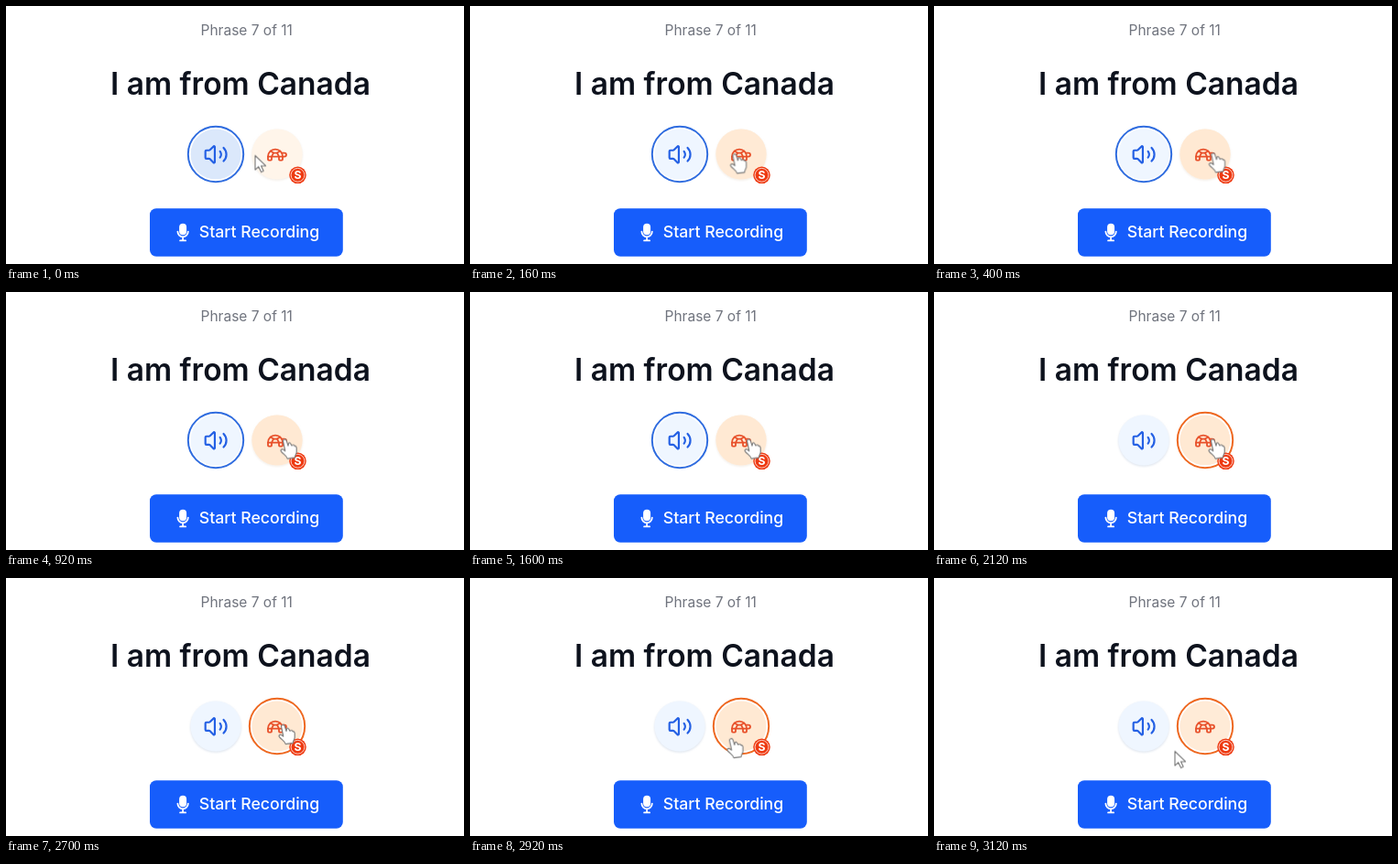
An HTML page for the animation above (3140 ms loop, 500 by 282 pixels).

```html
<!DOCTYPE html>
<html lang="en">
<head>
<meta charset="utf-8">
<title>Phrase practice</title>
<style>
  html, body { margin: 0; width: 100%; height: 100%; overflow: hidden; background: #fff; }
  svg { display: block; width: 100vw; height: 100vh; filter: blur(.35px); }
  text { font-family: Inter, sans-serif; font-optical-sizing: none; text-anchor: middle; }
  .line { fill: none; stroke-linecap: round; stroke-linejoin: round; }
  .cursor path { fill: #fff; stroke: #777; stroke-width: 1.1; stroke-linejoin: round; }
</style>
</head>
<body>
<svg viewBox="0 0 500 282">
  <defs>
    <filter id="soft" x="-20%" y="-20%" width="140%" height="140%">
      <feGaussianBlur stdDeviation="1.3"/>
    </filter>
  </defs>

  <text x="262.7" y="31.9" font-size="15.5" fill="#70747e">Phrase 7 of 11</text>
  <text x="256" y="96.7" font-size="33.5" font-weight="600" fill="#0d121d">I am from Canada</text>

  <!-- Normal speed -->
  <circle cx="229" cy="163" r="27.8" fill="#e0e6ef" filter="url(#soft)"/>
  <circle cx="229" cy="162" r="27.6" fill="#eff6ff"/>
  <circle id="speakerHover" cx="229" cy="162" r="27.6" fill="#dbe8fb"/>
  <g id="speakerRing" class="line">
    <circle cx="229" cy="162" r="28.5" stroke="#fff" stroke-width="1.8"/>
    <circle cx="229" cy="162" r="30.2" stroke="#2f6cdf" stroke-width="2"/>
  </g>
  <g class="line" transform="translate(215.4 148.6) scale(1.14)" stroke="#2460e4" stroke-width="1.9">
    <path d="M11 4.7a.7.7 0 0 0-1.2-.5L6.4 7.6A1.4 1.4 0 0 1 5.4 8H3a1 1 0 0 0-1 1v6a1 1 0 0 0 1 1h2.4a1.4 1.4 0 0 1 1 .4l3.4 3.4a.7.7 0 0 0 1.2-.5z"/>
    <path d="M16 9a5 5 0 0 1 0 6M19.4 18.4a9 9 0 0 0 0-12.8"/>
  </g>

  <!-- Slow speed -->
  <circle cx="296" cy="163" r="27.8" fill="#f3eee8" filter="url(#soft)"/>
  <circle cx="296" cy="162" r="27.6" fill="#fff5ea"/>
  <circle id="turtleHover" cx="296" cy="162" r="27.6" fill="#ffe9d3"/>
  <g id="turtleRing" class="line">
    <circle cx="296" cy="162" r="28.5" stroke="#fff" stroke-width="1.8"/>
    <circle cx="296" cy="162" r="30.2" stroke="#ee6820" stroke-width="2"/>
  </g>
  <g class="line" transform="translate(284 150.6)" stroke="#e8502a" stroke-width="1.8">
    <path d="m12 10 2 4v3a1 1 0 0 0 1 1h2a1 1 0 0 0 1-1v-3a8 8 0 1 0-16 0v3a1 1 0 0 0 1 1h2a1 1 0 0 0 1-1v-3l2-4h4Z"/>
    <path d="M4.8 7.9 8 10M15.2 7.9 12 10M16.9 10H20a2 2 0 0 1 0 4H2"/>
  </g>
  <circle cx="318.5" cy="184.8" r="9.3" fill="#ee3a12"/>
  <circle cx="318.5" cy="184.8" r="7.4" fill="none" stroke="#fff" stroke-opacity=".75" stroke-width="1"/>
  <text x="318.5" y="189.2" font-size="12.2" font-weight="700" fill="#fff">S</text>

  <!-- Record button -->
  <rect x="157" y="221.3" width="210.8" height="52.4" rx="7" fill="#165dfb"/>
  <rect x="189.1" y="237.7" width="8" height="12.6" rx="4" fill="#fff"/>
  <path class="line" d="M187.4 246.6a5.7 5.7 0 0 0 11.4 0M193.1 252.4v3.8M190.1 256.4h6" stroke="#fff" stroke-width="1.8"/>
  <text x="276.5" y="253.2" font-size="17.7" font-weight="500" fill="#fff">Start Recording</text>

  <g id="cursor" class="cursor">
    <path id="arrow" d="M0 0V15.5L3.8 12.2 6.6 18 9.2 16.8 6.5 11.2H11.6Z"/>
    <path id="hand" d="M-3.4 1.8C-3.8-.6-.4-1.2.3 1.2L2 6.6C3-.1 5 5 6 6.3 7.2 5.3 8.8 5.8 9.1 7 10.4 6.5 11.2 7.6 11.2 9V13.5C11.2 15.5 9.6 16.5 9.2 19.6L1.2 20.6C.4 17.6-3 16-5.6 12.8-6.8 11-4.6 9.8-3.2 10.8L-1.2 12.2Z"/>
  </g>
</svg>
<script>
  const LOOP = 3140;

  // Each step is [time in ms, value, optional easing towards the next step].
  function play(id, property, steps) {
    const last = steps[steps.length - 1];
    const keyframes = [...steps, [LOOP, last[1]]].map(([time, value, easing = "linear"]) => ({
      offset: time / LOOP,
      [property]: value,
      easing
    }));
    document.getElementById(id).animate(keyframes, { duration: LOOP, iterations: Infinity });
  }

  const at = (x, y) => `translate(${x}px, ${y}px)`;

  play("cursor", "transform", [
    [0, at(272, 163.5)],
    [20, at(272, 163.5), "ease-out"],
    [400, at(306.4, 161.2)],
    [680, at(306.4, 161.2), "ease-in-out"],
    [920, at(306, 161.5)],
    [2540, at(306, 161.5), "ease-in-out"],
    [2700, at(304, 160.8), "ease-in"],
    [2900, at(290, 174)],
    [3060, at(265, 188), "ease-out"],
    [3120, at(263, 189.5)]
  ]);

  const hardCut = "steps(1, end)";
  play("arrow", "opacity", [[0, 1, hardCut], [100, 0, hardCut], [2980, 1]]);
  play("hand", "opacity", [[0, 0, hardCut], [100, 1, hardCut], [2980, 0]]);

  play("speakerHover", "opacity", [[0, 1], [20, 1, "ease"], [180, 0]]);
  play("turtleHover", "opacity", [[0, 0], [60, 0, "ease"], [220, 1], [3060, 1], [3120, .8]]);

  play("speakerRing", "opacity", [[0, 1], [1620, 1, "ease"], [1760, 0]]);
  play("turtleRing", "opacity", [[0, 0], [1620, 0, "ease"], [1760, 1]]);
</script>
</body>
</html>
```
